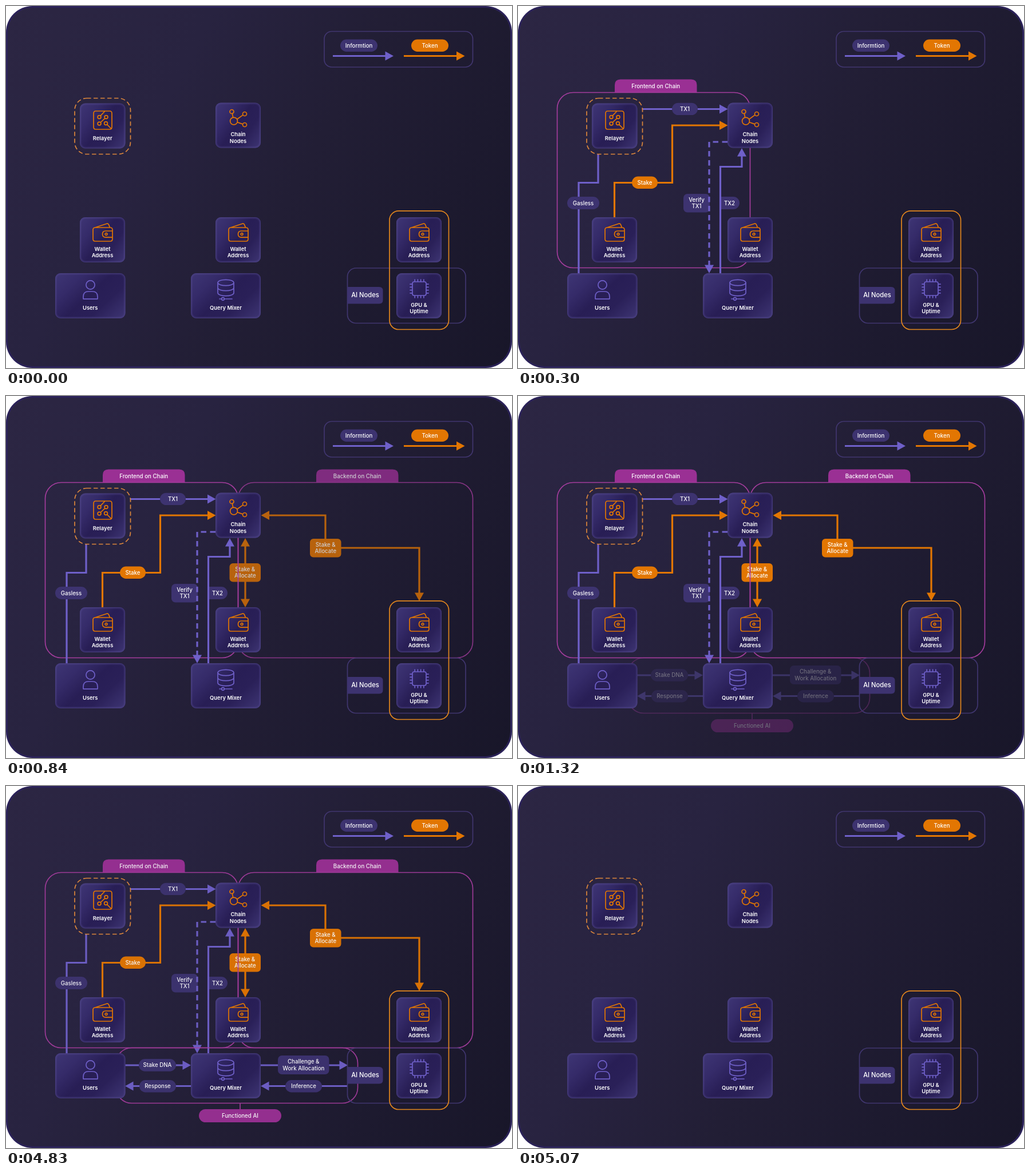
Animation of 884x634 px, one loop 5400 ms. Source, as an HTML page:

```html
<!DOCTYPE html>
<html lang="en">
<head>
<meta charset="utf-8">
<title>Token and information flow</title>
<style>
  html, body { margin: 0; width: 100%; height: 100%; overflow: hidden; background: #fff; }
  svg { display: block; width: 884px; height: 634px; }
  text { font: 500 9.7px Inter, "Noto Sans", sans-serif; fill: #fff; text-anchor: middle; }
  .node text { font-weight: 600; font-size: 9.4px; }
  .line { fill: none; stroke-width: 3.2; }
  .icon { fill: none; stroke-width: 1.7; stroke-linecap: round; stroke-linejoin: round; }
</style>
</head>
<body>
<svg id="stage" viewBox="0 0 884 634">
  <defs>
    <linearGradient id="bg" gradientUnits="userSpaceOnUse" x1="-33" y1="60" x2="917" y2="574">
      <stop offset="0" stop-color="#2c2643"/>
      <stop offset=".3" stop-color="#282340"/>
      <stop offset=".55" stop-color="#221e35"/>
      <stop offset="1" stop-color="#181629"/>
    </linearGradient>
    <linearGradient id="card" x1="0" y1=".15" x2="1" y2=".85">
      <stop offset="0" stop-color="#3c3372"/>
      <stop offset=".22" stop-color="#352b69"/>
      <stop offset=".48" stop-color="#281e55"/>
      <stop offset=".72" stop-color="#2a2058"/>
      <stop offset="1" stop-color="#3a316e"/>
    </linearGradient>
  </defs>
</svg>
<script>
const PURPLE = "#6f60c9", ORANGE = "#e27602", MAGENTA = "#9a3094", EDGE = "#a33c9c", SLATE = "#3d3370";
const stage = document.getElementById("stage");

const rect = (x, y, right, bottom, r, attrs) =>
  `<rect x="${x}" y="${y}" width="${right - x}" height="${bottom - y}" rx="${r}" ${attrs}/>`;
const frame = (x, y, right, bottom, r, color, extra = "") =>
  rect(x, y, right, bottom, r, `fill="none" stroke="${color}" stroke-width="1.7" ${extra}`);
const text = (x, y, lines, size) => lines.split("|").map((line, i) =>
  `<text x="${x}" y="${y + i * 11.2}"${size ? ` style="font-size:${size}px"` : ""}>${line}</text>`).join("");

// A label centred on its box, with one or two lines of text.
function label(x, y, right, bottom, words, color = SLATE, r = 10.7) {
  const rows = words.split("|").length;
  const baseline = (y + bottom) / 2 + 3.5 - (rows - 1) * 5.6;
  return rect(x, y, right, bottom, r, `fill="${color}"`) + text((x + right) / 2, baseline, words);
}

// Arrow head whose tip is at (x, y); angle 0 points right.
const head = (x, y, angle, color) =>
  `<path d="M0 0L-14.5-8V8Z" fill="${color}" transform="translate(${x} ${y}) rotate(${angle})"/>`;
const line = (d, color, extra = "") => `<path class="line" d="${d}" stroke="${color}" ${extra}/>`;
const icon = (d, color) => `<path class="icon" d="${d}" stroke="${color}"/>`;
const ring = (x, y, r) => `M${x - r} ${y}a${r} ${r} 0 1 0 ${2 * r} 0a${r} ${r} 0 1 0 ${-2 * r} 0`;

function node(x, y, right, words, textY, art) {
  return `<g class="node">${rect(x, y, right, y + 79, 9, 'fill="url(#card)"')}` +
    rect(x + 1.5, y + 1.5, right - 1.5, y + 77.5, 8, 'fill="none" stroke="#6a5fa8" stroke-opacity=".16" stroke-width="3"') +
    rect(x + .5, y + .5, right - .5, y + 78.5, 9, 'fill="none" stroke="#51478a" stroke-opacity=".6"') +
    art + text((x + right) / 2, textY, words) + "</g>";
}

function wallet(x) {
  const c = x + 40;
  const art = `M${c - 13} 388H${c + 13}q4 0 4 4V408q0 4-4 4H${c - 13}q-4 0-4-4V392q0-4 4-4` +
    `M${c - 15} 388.5L${c + 7} 381.2q2.5-.6 3.4 1.6l2.1 5` +
    `M${c + 17} 394H${c + 5}q-5.5 0-5.5 5.6t5.5 5.6H${c + 17}` + ring(c + 6, 399.6, 1.9);
  return node(x, 370, x + 79, "Wallet|Address", 429, icon(art, ORANGE));
}

function chip() {
  let d = "M713 483H731q3 0 3 3V504q0 3-3 3H713q-3 0-3-3V486q0-3 3-3";
  for (let i = 0; i < 4; i++) {
    const x = 714.2 + i * 5.2, y = 487.2 + i * 5.2;
    d += `M${x} 479v4M${x} 507v4M706 ${y}h4M734 ${y}h4`;
  }
  return icon(d, PURPLE);
}

const relayIcon = "M157 184H181q4 0 4 4V212q0 4-4 4H157q-4 0-4-4V188q0-4 4-4" +
  ring(163, 194.5, 2.9) + ring(175, 194.5, 2.9) + ring(163, 206, 2.9) + ring(174.5, 205.5, 2.9) +
  "M165 192.4L172 185M173 196.6L165 204M176.6 207.6L184 215";
const chainIcon = ring(398, 201.5, 6.4) + ring(394.5, 185, 3.5) + ring(417, 189, 3.5) + ring(417, 208, 3.5) +
  "M395.3 188.5L396.6 195.2M403.7 198.3L414 190.9M404.1 203.6L413.6 206.9";
const userIcon = ring(147.5, 488.5, 7.6) +
  "M135 512.5v-3.5q0-9 9-9h7q9 0 9 9v3.5q0 .7-.7.7h-23.6q-.7 0-.7-.7";
const mixerIcon = "M370 484.5a14 5.2 0 1 0 28 0a14 5.2 0 1 0-28 0V502.5a14 5.2 0 0 0 28 0V484.5" +
  "M370 493.5a14 5.2 0 0 0 28 0M373 513h3.5M381.5 513H395" + ring(379, 513, 2.3);

const backdrop = '<rect width="884" height="634" rx="46" fill="#2b2259"/>' +
  rect(3, 3, 881, 631, 43, 'fill="url(#bg)"');

const legend = frame(556, 44.5, 815.5, 107, 13, "#41366f") +
  label(584, 58.5, 649, 80, "Informtion") + label(708, 58.5, 773, 80, "Token", ORANGE) +
  line("M571 87.5H664", PURPLE) + head(677, 87.5, 0, PURPLE) +
  line("M695 87.5H788", ORANGE) + head(801.5, 87.5, 0, ORANGE);

const tab = (x, words) =>
  `<path d="M${x} 151.5V138.5q0-10 10-10h123.5q10 0 10 10v13z" fill="${MAGENTA}"/>` +
  text(x + 71.7, 143.6, words);

const frontend = tab(169, "Frontend on Chain") + frame(68.5, 151.5, 405.5, 458.5, 28, EDGE) +
  line("M218 180.5H354", PURPLE) + head(366.5, 180.5, 0, PURPLE) + label(269, 169.7, 314, 191, "TX1") +
  line("M106 468V309.5H140V260", PURPLE) + label(86, 334, 142, 356, "Gasless") +
  line("M168.5 370V309.5H269.5V209H354", ORANGE) + head(366.5, 209, 0, ORANGE) +
  label(199, 298.5, 244, 320, "Stake", ORANGE) +
  label(289, 329, 335, 361.5, "Verify|TX1", SLATE, 7) +
  line("M366 238H334V456", PURPLE, 'stroke-dasharray="9.5 6.5"') + head(334, 468, 90, PURPLE) +
  '<path d="M353.5 334H376a10.9 10.9 0 0 1 0 22H353.5z" fill="#3d3370"/>' + text(369.5, 348.5, "TX2") +
  line("M353.5 468V281.5H391V261", PURPLE) + head(391, 249, -90, PURPLE);

const backend = tab(542, "Backend on Chain") + frame(405.5, 151.5, 815.5, 458.5, 28, EDGE) +
  line("M418 261V358", ORANGE) + head(418, 249, -90, ORANGE) + head(418, 370, 90, ORANGE) +
  label(390.5, 293, 445, 325.5, "Stake &amp;|Allocate", ORANGE, 6) +
  line("M458 209H558V266H722V347", ORANGE) + head(445.5, 209, 180, ORANGE) + head(722, 359, 90, ORANGE) +
  label(531, 250, 585.5, 282.5, "Stake &amp;|Allocate", ORANGE, 6);

const functioned = frame(192.5, 458.5, 614.5, 555.5, 27, EDGE) +
  line("M409 556V567", EDGE, 'style="stroke-width:1.7"') +
  label(337, 566, 481, 589, "Functioned AI", MAGENTA, 11.5) +
  line("M208 489H311", PURPLE) + head(323, 489, 0, PURPLE) + label(232, 478, 297, 499.7, "Stake DNA") +
  line("M323 525.5H220", PURPLE) + head(208, 525.5, 180, PURPLE) + label(233, 515, 297, 536.5, "Response") +
  line("M445 489H585", PURPLE) + head(597, 489, 0, PURPLE) +
  label(475, 472, 564.5, 505, "Challenge &amp;|Work Allocation", SLATE, 7) +
  line("M597 525.5H457", PURPLE) + head(445, 525.5, 180, PURPLE) + label(488, 515, 552, 536.5, "Inference");

const nodes = frame(120, 161.5, 217.5, 259.5, 21, "#dd873b", 'stroke-dasharray="7.5 4.5"') +
  node(129, 170.5, 208.5, "Relayer", 235, icon(relayIcon, ORANGE)) +
  node(366, 169.5, 445, "Chain|Nodes", 228.3, icon(chainIcon, ORANGE)) +
  wallet(129) + wallet(366) +
  node(86, 468, 208.5, "Users", 532, icon(userIcon, PURPLE)) +
  node(323, 468, 445, "Query Mixer", 532, icon(mixerIcon, PURPLE)) +
  frame(596.5, 459, 803, 555.5, 15, "#40366f") +
  '<path d="M596.5 492H652q6.500 0 6.500 6.500V515q0 6.500-6.500 6.500H596.5z" fill="#3d3370"/>' +
  text(627.5, 510.3, "AI Nodes", 11.2) +
  wallet(682) + node(682, 468, 761, "GPU &amp;|Uptime", 526.5, chip()) +
  frame(670, 358.8, 773.5, 566.5, 16, "#e2861d");

const group = (id, content) => `<g id="${id}" opacity="0">${content}</g>`;
stage.insertAdjacentHTML("beforeend", backdrop + legend +
  group("backend", backend) + group("frontend", frontend) + group("functioned", functioned) + nodes);

const LOOP = 5400, STEP = 30;
const fades = [["frontend", 57, 243], ["backend", 627, 273], ["functioned", 1227, 273]]
  .map(([id, start, length]) => ({ el: document.getElementById(id), start, length }));
const ramp = (t, start, length) => Math.min(1, Math.max(0, (t - start) / length));

function update(now) {
  const t = Math.floor((now % LOOP) / STEP) * STEP;
  const leaving = ramp(t, 4818, 252);
  for (const { el, start, length } of fades)
    el.setAttribute("opacity", ramp(t, start, length) * (1 - leaving));
}

const began = performance.now();
function tick() {
  update(performance.now() - began);
  requestAnimationFrame(tick);
}
tick();
</script>
</body>
</html>
```
